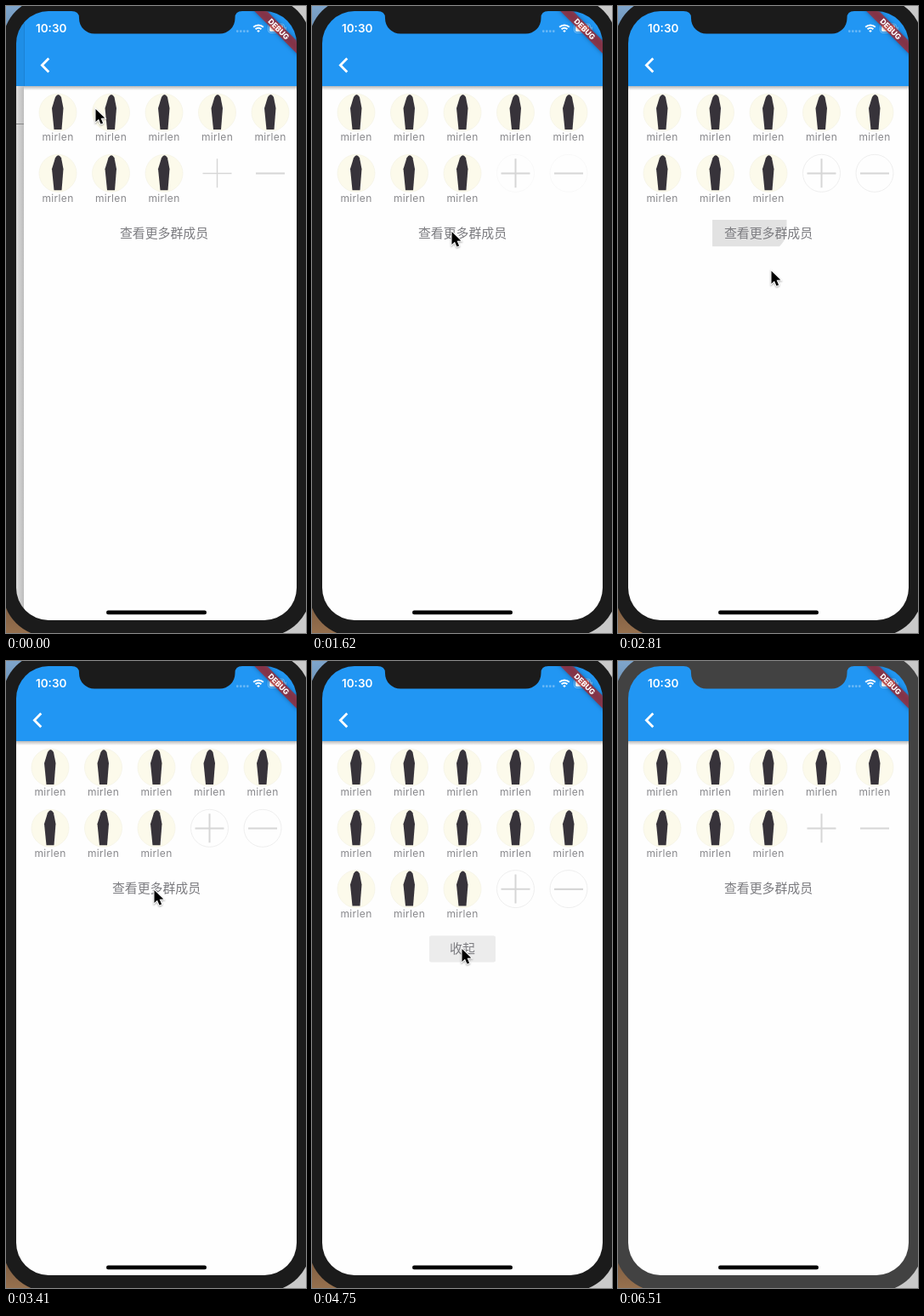
These frames come from a looping animation (353 by 736 pixels, 6.61 s). An HTML page with a canvas:

```html
<!DOCTYPE html>
<html lang="zh">
<head>
<meta charset="utf-8">
<title>Group members</title>
<style>
html, body { margin: 0; width: 100%; height: 100%; overflow: hidden; background: #1b1b1b; }
canvas { display: block; width: 353px; height: 736px; }
</style>
</head>
<body>
<canvas id="stage"></canvas>
<script>
const W = 353, H = 736, LOOP = 6610, STEP = 148, FLASH = 6510;
const canvas = document.getElementById('stage');
const ctx = canvas.getContext('2d');
const dpr = window.devicePixelRatio || 1;
canvas.width = W * dpr;
canvas.height = H * dpr;

const SANS = 'Inter, "Noto Sans", sans-serif';
const CJK = '"Noto Sans CJK SC", "Noto Sans CJK", sans-serif';
const BLUE = '#2196f3';
const NAME = 'mirlen';

// Pointer stops: step, x, y
const pointer = [
  [0, 105, 121], [3, 118, 150], [8, 158, 258], [11, 164, 265], [13, 165, 267],
  [15, 178, 318], [16, 179, 330], [17, 180, 326], [19, 180, 311], [21, 176, 276],
  [23, 174, 269], [25, 172, 270], [27, 172, 353], [29, 172, 410], [30, 173, 398],
  [32, 176, 338], [33, 177, 336], [36, 192, 698]
];

function pointerAt(k) {
  let i = 0;
  while (i < pointer.length - 2 && pointer[i + 1][0] < k) i++;
  const [k0, x0, y0] = pointer[i], [k1, x1, y1] = pointer[i + 1];
  const p = Math.min(1, Math.max(0, (k - k0) / (k1 - k0)));
  return [x0 + (x1 - x0) * p, y0 + (y1 - y0) * p];
}

function rect(x, y, w, h, color) {
  ctx.fillStyle = color;
  ctx.fillRect(x, y, w, h);
}

function round(x, y, w, h, r, color) {
  ctx.beginPath();
  ctx.roundRect(x, y, w, h, r);
  if (color) {
    ctx.fillStyle = color;
    ctx.fill();
  }
}

function line(points, color, width) {
  ctx.beginPath();
  points.forEach(([x, y]) => ctx.lineTo(x, y));
  ctx.strokeStyle = color;
  ctx.lineWidth = width;
  ctx.stroke();
}

function text(str, x, y, font, color, align = 'center', spacing = 0) {
  ctx.font = font;
  ctx.fillStyle = color;
  ctx.textAlign = align;
  ctx.letterSpacing = spacing + 'px';
  ctx.fillText(str, x, y);
  ctx.letterSpacing = '0px';
}

function fade(x0, y0, x1, y1, from, to) {
  const g = ctx.createLinearGradient(x0, y0, x1, y1);
  g.addColorStop(0, from);
  g.addColorStop(1, to);
  return g;
}

function cell(i) {
  return [52 + (i % 5) * 62.5, 125 + Math.floor(i / 5) * 71.3];
}

function member(i, alpha) {
  const [x, y] = cell(i);
  ctx.beginPath();
  ctx.arc(x, y, 22, 0, 7);
  ctx.fillStyle = '#fcfaeb';
  ctx.fill();
  ctx.strokeStyle = '#f4f2e4';
  ctx.lineWidth = 0.7;
  ctx.stroke();
  ctx.globalAlpha = alpha;
  ctx.beginPath();
  ctx.moveTo(x - 3, y - 18);
  ctx.quadraticCurveTo(x + 0.5, y - 24, x + 4, y - 18);
  ctx.lineTo(x + 6.5, y - 5);
  ctx.lineTo(x + 4.5, y + 20);
  ctx.lineTo(x - 4.5, y + 20);
  ctx.lineTo(x - 7, y - 5);
  ctx.closePath();
  ctx.fillStyle = '#37333a';
  ctx.fill();
  ctx.globalAlpha = 1;
  text(NAME, x, y + 33.3, '400 12px ' + SANS, '#88888c', 'center', 0.35);
}

function action(i, ring, plus, thick) {
  const [x, y] = cell(i);
  if (ring) {
    ctx.globalAlpha = ring;
    ctx.beginPath();
    ctx.arc(x, y, 22, 0, 7);
    ctx.strokeStyle = '#ededed';
    ctx.lineWidth = 0.9;
    ctx.stroke();
    ctx.globalAlpha = 1;
  }
  line([[x - 17, y + 0.2], [x + 17, y + 0.2]], '#d6d6d6', plus ? thick : 2.2);
  if (plus) line([[x, y - 17], [x, y + 17]], '#d6d6d6', thick);
}

function ripple(k, open) {
  const grey = { 12: '#ececec', 17: '#ececec', 18: '#e2e2e2', 19: '#e2e2e2', 20: '#f3f3f3', 24: '#ececec', 32: '#ececec' }[k];
  if (!grey) return;
  if (open) return round(138, 322.5, 78, 31, 2, grey);
  ctx.beginPath();
  ctx.moveTo(111, 251);
  ctx.lineTo(198.5, 251);
  ctx.lineTo(198.5, 269);
  ctx.quadraticCurveTo(196, 276, 190, 282.3);
  ctx.lineTo(111, 282.3);
  ctx.fillStyle = grey;
  ctx.fill();
}

function page(k, late) {
  const dx = k < 4 ? Math.round(9 * Math.exp(-k * 1.1)) : 0;
  const open = (k >= 14 && k < 18) || (k >= 25 && k < 33);
  const count = open ? 13 : 8;

  if (dx) {
    rect(12, 6, dx, 88, '#1f8ee6');
    rect(12, 94, dx, 630, fade(12, 0, 12 + dx, 0, '#dedede', '#bcbcbc'));
    rect(12, 138, dx, 1, '#868686');
  }
  ctx.save();
  ctx.translate(dx, 0);
  rect(12, 94, 332, 630, '#fefefe');
  rect(12, 94, 332, 5, fade(0, 94, 0, 99, 'rgba(0,0,0,.27)', 'rgba(0,0,0,0)'));
  rect(12, 6, 332, 88, BLUE);
  if (dx) rect(12, 6, 1, 88, '#1c82d4');
  line([[41.3, 61.5], [33.4, 69.5], [41.3, 77.5]], '#fff', 2.8);

  const oldAlpha = k === 14 ? 0.88 : k === 15 ? 0.78 : 1;
  for (let i = 0; i < count; i++) member(i, i < 8 ? oldAlpha : 1);
  const ring = late || k < 9 ? 0 : k < 13 ? 0.4 : 1;
  const thick = k < 9 ? 1.4 : 2;
  action(count, ring, true, thick);
  action(count + 1, ring, false, thick);

  ripple(k, open);
  text(open ? '收起' : '查看更多群成员', 177, open ? 343.3 : 272, '500 14.9px ' + CJK, '#7c7c80');
  ctx.restore();
}

function statusBar() {
  text('10:30', 35, 31.2, '600 13.5px ' + SANS, '#fff', 'left');
  for (let i = 0; i < 4; i++) round(271 + i * 4, 28.3, 2.6, 2.6, 0.8, 'rgba(255,255,255,.32)');
  ctx.strokeStyle = '#fff';
  ctx.lineWidth = 2;
  for (const r of [4.8, 8.2]) {
    ctx.beginPath();
    ctx.arc(297, 30.6, r, -Math.PI * 0.75, -Math.PI * 0.25);
    ctx.stroke();
  }
  ctx.beginPath();
  ctx.moveTo(297, 31);
  ctx.arc(297, 31, 2.6, -Math.PI * 0.75, -Math.PI * 0.25);
  ctx.fillStyle = '#fff';
  ctx.fill();
  round(308.5, 21, 19, 10.4, 3);
  ctx.strokeStyle = 'rgba(255,255,255,.45)';
  ctx.lineWidth = 0.9;
  ctx.stroke();
  round(310, 22.5, 16, 7.4, 1.6, '#fff');
  round(328.4, 24.6, 1.3, 3.4, 0.6, 'rgba(255,255,255,.5)');
}

function banner() {
  ctx.save();
  ctx.translate(342, 6);
  ctx.rotate(Math.PI / 4);
  ctx.shadowColor = 'rgba(0,0,0,.5)';
  ctx.shadowBlur = 5 * dpr;
  rect(-45, 24.6, 90, 10.6, 'rgba(183,28,28,.68)');
  ctx.shadowColor = 'transparent';
  text('DEBUG', 0, 33.1, '800 8.8px ' + SANS, '#fff');
  ctx.restore();
}

function desktop() {
  rect(0, 0, W, H, '#c9c9c9');
  rect(0, 0, 60, 60, fade(0, 0, 0, 50, '#7fa5cb', '#5f87ad'));
  rect(0, 680, 60, 56, fade(0, 700, 0, 736, '#7d5c40', '#96704e'));
}

function notch(color) {
  ctx.beginPath();
  ctx.moveTo(77, 5);
  ctx.lineTo(77, 6);
  ctx.quadraticCurveTo(86, 6, 86, 14);
  ctx.arcTo(86, 32.5, 106, 32.5, 18);
  ctx.arcTo(269.5, 32.5, 269.5, 14, 18);
  ctx.lineTo(269.5, 14);
  ctx.quadraticCurveTo(269.5, 6, 278, 6);
  ctx.lineTo(278, 5);
  ctx.fillStyle = color;
  ctx.fill();
}

function arrow(x, y) {
  const shape = [[0, 0], [0, 15], [3.5, 11.8], [6, 17.5], [8.6, 16.4], [6.1, 10.8], [10.8, 10.6]];
  ctx.save();
  ctx.translate(x + 0.5, y);
  ctx.beginPath();
  shape.forEach(([px, py]) => ctx.lineTo(px, py));
  ctx.closePath();
  ctx.shadowColor = 'rgba(0,0,0,.35)';
  ctx.shadowBlur = 2 * dpr;
  ctx.shadowOffsetY = dpr;
  ctx.lineWidth = 2;
  ctx.strokeStyle = '#fff';
  ctx.stroke();
  ctx.shadowColor = 'transparent';
  ctx.fillStyle = '#000';
  ctx.fill();
  ctx.restore();
}

function draw(t) {
  const k = Math.min(37, Math.floor((t + 10) / STEP));
  const late = t >= FLASH;
  const bezel = late ? '#424242' : '#1b1b1b';
  ctx.setTransform(dpr, 0, 0, dpr, 0, 0);
  desktop();
  round(-4, -10, 363, 750, 54, bezel);

  ctx.save();
  round(12, 6, 330, 715, 38);
  ctx.clip();
  page(k, late);
  statusBar();
  banner();
  ctx.restore();

  notch(bezel);
  round(118, 709.6, 118, 4.6, 2.3, '#000');
  if (k < 37) arrow(...pointerAt(k));
}

const start = performance.now();
function tick() {
  draw((performance.now() - start) % LOOP);
  requestAnimationFrame(tick);
}
tick();
</script>
</body>
</html>
```
